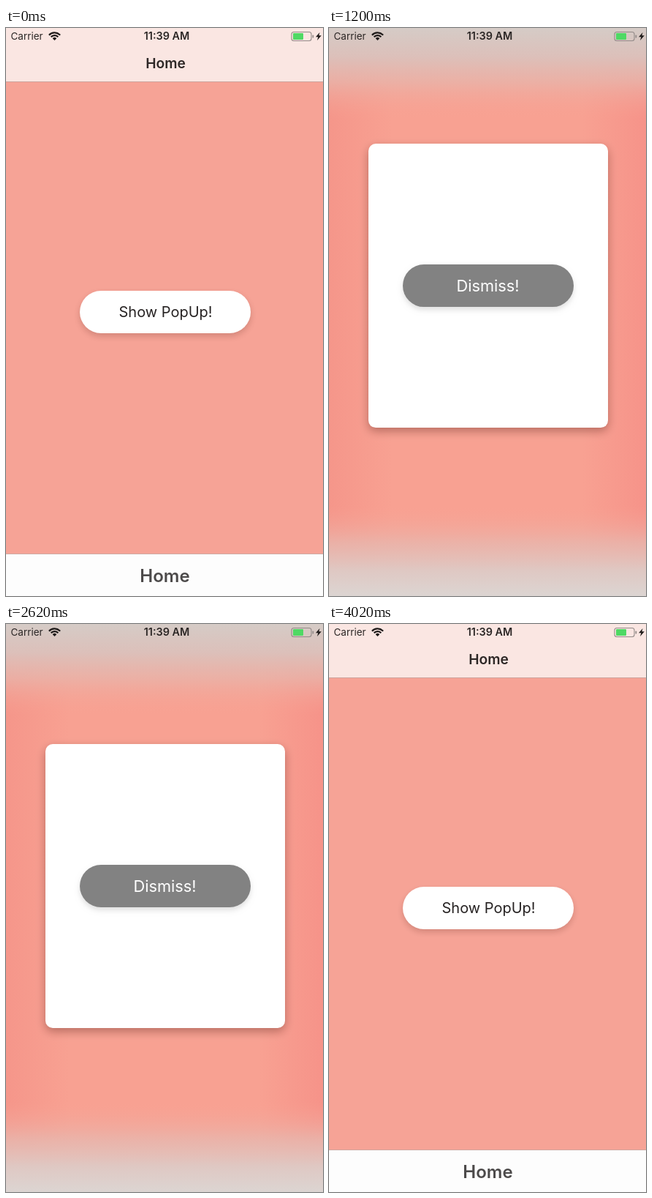
Recreate the animation shown at these times as an HTML page with a canvas. Size 434 by 776 pixels, loop 4.1 s.

```html
<!DOCTYPE html>
<html lang="en">
<head>
<meta charset="utf-8">
<title>Popup</title>
<style>
  html, body { margin: 0; width: 100%; height: 100%; overflow: hidden; background: #f6a396; }
  canvas { display: block; width: 434px; height: 776px; }
</style>
</head>
<body>
<canvas id="stage" width="434" height="776"></canvas>
<script>
const W = 434, H = 776, LOOP = 4100;
const SHOW = 968, DISMISS = 2861, FADE = 200, PRESS = 200;
const CARD_Y = 164;
const ctx = document.getElementById('stage').getContext('2d');
const clamp = v => Math.min(1, Math.max(0, v));

function rect(x, y, w, h, color) {
  ctx.fillStyle = color;
  ctx.fillRect(x, y, w, h);
}

function round(x, y, w, h, r, color, shadow) {
  ctx.save();
  if (shadow) {
    ctx.shadowColor = shadow.color;
    ctx.shadowBlur = shadow.blur;
    ctx.shadowOffsetY = shadow.y;
  }
  ctx.fillStyle = color;
  ctx.beginPath();
  ctx.roundRect(x, y, w, h, r);
  ctx.fill();
  ctx.restore();
}

function text(str, x, y, size, color, weight = 400, align = 'center') {
  ctx.font = `${weight} ${size}px Inter, Roboto, sans-serif`;
  ctx.textAlign = align;
  ctx.fillStyle = color;
  ctx.fillText(str, x, y);
}

// Soft white touch highlight
function glow(x, y, alpha) {
  if (alpha <= 0) return;
  const r = 46;
  const g = ctx.createRadialGradient(x, y, 0, x, y, r);
  g.addColorStop(0, `rgba(255,255,255,${alpha})`);
  g.addColorStop(0.5, `rgba(255,255,255,${alpha * 0.42})`);
  g.addColorStop(1, 'rgba(255,255,255,0)');
  rect(x - r, y - r, 2 * r, 2 * r, g);
}

// Highlight appears on touch and fades after release
const touch = (t, release) =>
  0.8 * clamp((t - release + PRESS) / 40) * clamp(1 - (t - release) / 150);

function home(t) {
  rect(0, 0, W, H, '#f6a396');
  rect(0, 0, W, 73, '#fae6e2');
  rect(0, 73, W, 1, '#cda49d');
  text('Home', 218.5, 55, 19.2, '#2d2726', 600);
  rect(0, 718, W, 1, '#cfa8a1');
  rect(0, 719, W, 57, '#fdfdfd');
  text('Home', 217.5, 757, 24, '#4c4a4a', 600);
  round(101, 359, 234, 58, 29, '#fff', { color: 'rgba(70,20,10,.2)', blur: 8, y: 4 });
  text('Show PopUp!', 218.5, 395, 20, '#262222');
  glow(218, 388, touch(t, SHOW));
}

// Blurred backdrop, painted once and faded as a whole
const backdrop = (() => {
  const canvas = document.createElement('canvas');
  canvas.width = W;
  canvas.height = H;
  const c = canvas.getContext('2d');
  const fill = (x, y, stops) => {
    const g = c.createLinearGradient(0, 0, x, y);
    for (const [at, color] of stops) g.addColorStop(at, color);
    c.fillStyle = g;
    c.fillRect(0, 0, W, H);
  };
  fill(W, 0, [[0, '#f5968a'], [0.2, '#f8a192'], [0.8, '#f8a192'], [1, '#f69389']]);

  // Only the shadow of this shape lands on the canvas
  c.save();
  c.shadowColor = 'rgba(255,255,255,.6)';
  c.shadowBlur = 60;
  c.shadowOffsetX = 1000;
  c.beginPath();
  c.roundRect(101 - 1000, 359, 234, 58, 29);
  c.fill();
  c.restore();

  fill(0, H, [
    [0, '#d5cbc6'], [0.05, '#dcc0ba'], [0.095, 'rgba(232,180,170,.8)'],
    [0.16, 'rgba(248,161,146,0)'], [0.84, 'rgba(248,161,146,0)'],
    [0.905, 'rgba(232,182,173,.8)'], [0.955, '#dfc8c3'], [1, '#dcd5d2']
  ]);
  return canvas;
})();

function blurredHome(alpha) {
  ctx.globalAlpha = alpha;
  ctx.drawImage(backdrop, 0, 0);
  ctx.globalAlpha = 1;
}

// Underdamped spring from 0 to 1
function spring(t) {
  const damping = 0.8, omega = 0.019, k = Math.sqrt(1 - damping * damping);
  const a = omega * k * t;
  return 1 - Math.exp(-damping * omega * t) * (Math.cos(a) + damping / k * Math.sin(a));
}

function cardTop(t) {
  if (t < SHOW) return H + 200;
  if (t < DISMISS) return CARD_Y + H * (1 - spring(t - SHOW));
  return CARD_Y + 805 * clamp((t - DISMISS) / FADE) ** 1.73;
}

function card(t) {
  const y = cardTop(t);
  if (y > H + 20) return;
  round(54, y, 328, 388, 10, '#fff', { color: 'rgba(70,20,10,.36)', blur: 13, y: 5 });
  round(101, y + 165, 234, 58, 29, '#828282', { color: 'rgba(0,0,0,.12)', blur: 7, y: 4 });
  text('Dismiss!', 217.5, y + 202, 21.8, '#fff');
  glow(217.5, y + 194, touch(t, DISMISS));
}

function statusBar() {
  text('Carrier', 6.5, 16, 13.5, '#2b2625', 400, 'left');
  text('11:39 AM', 220, 16, 14.4, '#2b2625', 600);

  ctx.strokeStyle = ctx.fillStyle = '#1f1b1a';
  ctx.lineWidth = 2.3;
  for (const r of [6.6, 10.4]) {
    ctx.beginPath();
    ctx.arc(66.5, 16.8, r, -Math.PI * 0.76, -Math.PI * 0.24);
    ctx.stroke();
  }
  ctx.beginPath();
  ctx.moveTo(66.5, 17);
  ctx.arc(66.5, 16.8, 3.8, -Math.PI * 0.76, -Math.PI * 0.24);
  ctx.fill();

  ctx.strokeStyle = '#938b89';
  ctx.lineWidth = 1.1;
  ctx.beginPath();
  ctx.roundRect(391, 5.5, 27, 12, 3);
  ctx.stroke();
  round(393, 7, 14, 9, 1, '#4fd964');
  round(419.5, 9.5, 1.7, 4, 1, '#938b89');

  ctx.fillStyle = '#1f1b1a';
  ctx.beginPath();
  for (const [x, y] of [[429.5, 6], [424, 12.2], [427.3, 12.2], [426, 17], [431.8, 10.3], [428.4, 10.3]]) {
    ctx.lineTo(x, y);
  }
  ctx.fill();
}

function draw() {
  const t = performance.now() % LOOP;
  home(t);
  blurredHome(clamp((t - SHOW) / FADE) * clamp(1 - (t - DISMISS) / FADE));
  card(t);
  statusBar();
  requestAnimationFrame(draw);
}
draw();
</script>
</body>
</html>
```
